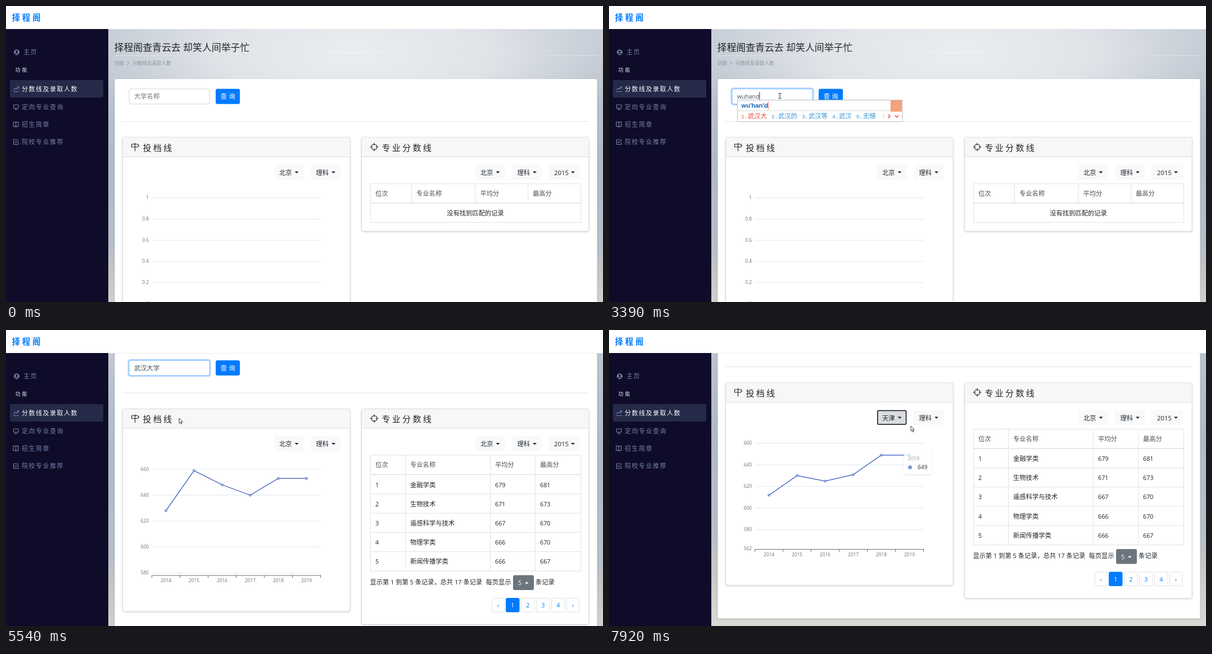
Animation, 1062 px wide and 527 px high, one loop 8000 ms. Source, as an HTML page:

```html
<!DOCTYPE html>
<html lang="zh-CN">
<head>
<meta charset="utf-8">
<title>分数线查询</title>
<style>
html, body { margin: 0; width: 100%; height: 100%; overflow: hidden; background: #fff; }
svg { display: block; width: 100%; height: 100%; font-family: "Open Sans", "Noto Sans CJK SC", "Noto Sans CJK", sans-serif; }
.mid { text-anchor: middle; }
.end { text-anchor: end; }
.bold { font-weight: 700; }
.ime { font-family: "Liberation Sans", sans-serif; font-weight: 700; }
.mono { font-family: "Liberation Mono", monospace; }
.line { fill: none; stroke-linecap: round; stroke-linejoin: round; }
.card { filter: drop-shadow(0 1px 1.5px rgba(0,0,0,.16)); }
</style>
</head>
<body>
<svg viewBox="0 0 1062 527" preserveAspectRatio="none">
  <defs>
    <linearGradient id="sky" x2="0" y2="1">
      <stop offset="0" stop-color="#c3cad4"/><stop offset=".45" stop-color="#b0bac7"/>
      <stop offset=".72" stop-color="#b7bfc9"/><stop offset=".8" stop-color="#c6c5c3"/>
      <stop offset="1" stop-color="#dddbd7"/>
    </linearGradient>
    <radialGradient id="glow">
      <stop offset="0" stop-color="#eceef1"/><stop offset=".5" stop-color="#e5e8ec" stop-opacity=".85"/>
      <stop offset="1" stop-color="#dfe3e8" stop-opacity="0"/>
    </radialGradient>
    <clipPath id="view"><path d="M182 41H1062V527H182z"/></clipPath>
  </defs>
  <g clip-path="url(#view)"><g id="page">
    <g id="backdrop"></g><g id="frame"></g><g id="search"></g>
    <g id="table"></g><g id="chart"></g><g id="picker"></g>
  </g></g>
  <g id="shell"></g><g id="overlay"></g><g id="cursor"></g>
</svg>
<script>
const LOOP = 8000, BLINK = 530;
const FOCUS = 1380, COMMIT = 3700, RESULT = 4230, CHART = 4310, HOVER = 5980, OPEN = 6770, PICK = 7540;
const BRAND = '择程阁', INK = '#212529', GREY = '#dee2e6';

const cache = {};
function put(id, html) {
  if (cache[id] !== html) document.getElementById(id).innerHTML = cache[id] = html;
}
const text = (x, y, s, size = 11.3, fill = INK, more = '') =>
  `<text x="${x}" y="${y}" font-size="${size}" fill="${fill}" ${more}>${s}</text>`;
const rect = (x, y, w, h, fill, r = 0, more = '') =>
  `<rect x="${x}" y="${y}" width="${w}" height="${h}" rx="${r}" fill="${fill}" ${more}/>`;
const path = (d, stroke, width = 1, more = '') =>
  `<path class="line" d="${d}" stroke="${stroke}" stroke-width="${width}" ${more}/>`;
const spaced = n => `letter-spacing="${n}"`;
const clamp = v => Math.min(1, Math.max(0, v));
const mix = (a, b, k) => a + (b - a) * k;
const ease = k => k * k * (3 - 2 * k);

// Position on a list of [time, ...values] keys
function track(keys, t) {
  let i = 0;
  while (i < keys.length - 2 && t >= keys[i + 1][0]) i++;
  const [a, b] = [keys[i], keys[i + 1]];
  const k = clamp((t - a[0]) / (b[0] - a[0]));
  return a.slice(1).map((v, j) => mix(v, b[j + 1], k));
}

const pen = document.createElement('canvas').getContext('2d');
function widthOf(s, font) {
  pen.font = font;
  return pen.measureText(s).width;
}

function dropdown(x, w, label, fill = '#f8f9fa', more = '') {
  const c = x + w - 16;
  return rect(x, 282.5, w, 26.5, fill, 2.5, more) + text(x + 9.5, 300.5, label) +
    `<path d="M${c} 294.5h7l-3.5 3.5z" fill="${INK}"/>`;
}

function card(x, bottom, title, icon) {
  return `<g class="card">${rect(x, 234, 404.5, bottom - 234, '#fff', 3, 'stroke="#d9dadc"')}</g>` +
    rect(x + .5, 234.5, 403.5, 33.5, '#f7f7f7', 2.5) + path(`M${x} 268.5h404`, '#dcdcdc') +
    path(icon, INK, 1.1) + text(x + 36, 257.5, title, 15, INK, spaced(3.3));
}

function drawShell() {
  const muted = '#7680ab';
  const items = [
    [152, '分数线及录取人数', 'M13 152.5h10M13.5 149l3-2.5 2 1.5 4-4M20 144h2.5v2.5'],
    [183.5, '定向专业查询', 'M13.5 176h8.500v6h-8.500zM17.500 182v2M15.500 184.500h4.500'],
    [215, '招生简章', 'M17.500 207.500q-2-1.500-4.500-1v8q2.500-.5 4.500 1 2-1.500 4.500-1v-8q-2.500-.5-4.500 1v8'],
    [246, '院校专业推荐', 'M20 238h-6.500v8.500h8.500v-4M15.500 241.500l2 2.500 5-6']
  ];
  put('shell',
    rect(0, 0, 1062, 41, '#fff') + path('M0 41.500H1062', '#dfe1e5', .6) +
    text(10.5, 26, BRAND, 14.5, '#007bff', 'class="bold" ' + spaced(3.7)) +
    rect(0, 41, 182, 486, '#0e0c28') + rect(7, 132, 166, 31, '#252a49', 2) +
    `<circle cx="19" cy="82.500" r="5" fill="${muted}"/><circle cx="19" cy="81" r="1.900" fill="#0e0c28"/>` +
    path('M16 85.500q3-3 6 0', '#0e0c28', 1.4) +
    text(31, 86, '主页', 11, muted, spaced(1.5)) +
    text(16.5, 117, '功能', 9, '#e6e8f2', spaced(3)) +
    items.map(([y, s, icon], i) => path(icon, muted, 1.1) +
      text(28, y, s, 11, i ? muted : '#fff', spaced(1.5))).join(''));
}

function drawFrame(full) {
  put('backdrop', rect(182, 41, 880, full ? 640 : 540, 'url(#sky)') +
    `<ellipse cx="${full ? 560 : 620}" cy="85" rx="${full ? 450 : 500}" ry="170" fill="url(#glow)"/>`);
  put('frame',
    path('M193 88.500H1052', GREY) +
    text(192.5, 80, BRAND + '查青云去 却笑人间举子忙', 16.9) +
    text(193, 105, '功能', 8.55, '#8f959d') + path('M216 99.500l2.500 2.500-2.500 2.500', '#7d848c') +
    text(225, 105, '分数线及录取人数', 8.55, '#8f959d') +
    `<g class="card">${rect(193.5, 130, 858, full ? 523.5 : 501, '#fff', 3)}</g>` +
    path('M207 205.500H1037', '#e5e5e5') +
    card(207.5, 594.5, '投档线', 'M229.500 244v14M229.500 246h-6v5h10.500l2.500-2.500-2.500-2.500z') +
    card(632.5, full ? 617.5 : 401, '专业分数线',
      'M650 251a5 5 0 1 0 10 0a5 5 0 1 0-10 0M655 244v4M655 254v4M648 251h4M658 251h4') +
    dropdown(542, 53, '理科') + dropdown(834.5, 53, '北京') +
    dropdown(900, 53, '理科') + dropdown(965.5, 55.5, '2015'));
}

function drawTable(full) {
  const cols = full ? [648.5, 710.5, 861.5, 941.5, 1022.5] : [648.5, 721.5, 835, 928.5, 1022.5];
  const rows = ['金融学类 679 681', '生物技术 671 673', '遥感科学与技术 667 670', '物理学类 666 670', '新闻传播学类 666 667'];
  const bottom = full ? 522.5 : 385.5;
  let s = rect(648.5, 316.5, 374, bottom - 316.5, '#fff', 0, `stroke="${GREY}"`) +
    path('M648.500 351H1022.500', GREY, 1.6);
  cols.slice(1, 4).forEach(x => s += path(`M${x} 316.500V${full ? bottom : 351}`, GREY));
  ['位次', '专业名称', '平均分', '最高分'].forEach((h, i) => s += text(cols[i] + 8.5, 337.5, h, 11.3, '#495057'));
  if (!full) return put('table', s + text(835, 373, '没有找到匹配的记录', 11.3, INK, 'class="mid"'));
  rows.forEach((row, i) => {
    const y = 373 + i * 34.2;
    if (i) s += path(`M648.500 ${y - 21.7}H1022.500`, GREY);
    [i + 1, ...row.split(' ')].forEach((v, j) =>
      s += text(cols[j] + 8.5, y, v, j === 1 ? 11.3 : 10.8));
  });
  s += text(647.5, 546, '显示第 1 到第 5 条记录，总共 17 条记录', 11.2) + text(853.5, 546, '每页显示') +
    rect(902, 530, 37, 26.5, '#6c757d', 3) + text(911, 547.5, 5, 10.8, '#fff') +
    '<path d="M923 545h6.500l-3.250-3.500z" fill="#fff"/>' + text(942, 546, '条记录');
  ['‹', 1, 2, 3, 4, '›'].forEach((p, i) => {
    const x = [864.5, 889.5, 916.5, 943.5, 970.5, 997.5][i], w = i % 5 ? 23.5 : 22, on = p === 1;
    s += rect(x, 571, w, 24.5, on ? '#007bff' : '#fff', 2, `stroke="${on ? '#007bff' : GREY}"`) +
      text(x + w / 2, 587.5, p, 10.8, on ? '#fff' : '#007bff', 'class="mid"');
  });
  put('table', s);
}

function drawChart(t) {
  const BASE = 530.5, HIGH = 189, soft = '#6e7079';
  const full = t >= CHART, k = ease(clamp((t - PICK) / 320));
  const min = full ? mix(578, 562, k) : 0, max = full ? 660 : 1;
  const yOf = v => BASE - (v - min) / (max - min) * HIGH;
  const label = (y, v, o = 1) => text(254, y + 2.5, v, 8.4, soft, `class="end" opacity="${o}"`);
  const ticks = full ? [580, 600, 620, 640, 660] : [0, .2, .4, .6, .8, 1];
  let s = ticks.map(v => path(`M260 ${yOf(v)}H560`, '#e0e6f1') + label(yOf(v), v)).join('');
  s += path(`M260 ${BASE}H560` + [0, 1, 2, 3, 4, 5, 6].map(i => `M${259.5 + i * 50} ${BASE}v4`).join(''), soft);
  if (full) {
    if (k) s += label(BASE - 1.5, 562, k);
    const before = [628, 659, 648, 640, 653, 653], after = [612, 630, 625, 631, 649, 649];
    const dots = before.map((v, i) => [284.5 + i * 50, yOf(mix(v, after[i], k))]);
    s += dots.map(([x], i) => text(x, BASE + 12, 2014 + i, 8.4, soft, 'class="mid"')).join('') +
      path('M' + dots.join('L'), '#5470c6', 1.5) +
      dots.map(([x, y]) => `<circle cx="${x}" cy="${y}" r="1.600" fill="#fff" stroke="#5470c6" stroke-width="1.300"/>`).join('');
    if (t >= 7630 && t < 7850) s += path(`M534.500 ${BASE}V341.500`, '#b9bec9', .8, 'stroke-dasharray="3 3"');
  }
  put('chart', s);
}

function drawPicker(t) {
  const fill = t >= OPEN ? '#d9dce1' : t >= HOVER ? '#e0e3e7' : '#f8f9fa';
  let s = dropdown(476.5, 53, t >= PICK ? '天津' : '北京', fill);
  if (t >= OPEN) s += rect(477.8, 283.4, 50.7, 24.7, 'none', 2, 'stroke="#15151c" stroke-width="1.500"');
  put('picker', s);
}

const typing = [
  [2290, 'w', '我 为 问 无 ⑤'], [2610, "wu", '无 五 吴 物 ⑤'],
  [2840, "wu'h", '武汉 误会 舞会 无悔 武侯'], [3160, "wu'ha", '武汉 无害 五行 误航 无憾'],
  [3230, "wu'han", '武汉 无憾 五行 无汗 无寒'], [3390, "wu'han'd", '武汉大 武汉的 武汉等 武汉 无憾'],
  [3470, "wu'han'da", '武汉大 武汉达 武汉打 武汉 无憾'], [3620, "wu'han'da'x", '武汉大学 武汉大 武汉 无憾 五行']
];
const typed = t => t < COMMIT ? typing.filter(e => t >= e[0]).pop() : undefined;

function drawSearch(t) {
  const entry = typed(t), done = t >= COMMIT, focus = clamp((t - FOCUS) / 150);
  let s = focus ? rect(217.6, 146.4, 145.8, 29.2, 'none', 4, `stroke="#007bff" stroke-opacity="${.3 * focus}" stroke-width="2.400"`) : '';
  s += rect(219, 147.7, 143, 26.8, '#fff', 3, `stroke="${focus > .5 ? '#80bdff' : '#ced4da'}"`);
  let x = 228;
  if (entry) {
    const raw = entry[1].replace(/'/g, '');
    s += text(228, 165, raw, 10.4, '#495057');
    x += widthOf(raw, '10.4px "Open Sans", sans-serif');
  } else {
    s += text(228, 165, done ? '武汉大学' : '大学名称', 11.3, done ? '#495057' : '#6c757d');
    if (done) x += 44.7;
  }
  const since = done ? COMMIT : FOCUS;
  const lit = entry || (t >= FOCUS && Math.floor((t - since) / BLINK) % 2 === 0);
  if (lit) s += path(`M${x + .5} 153.500v14`, '#222', .9);
  s += rect(373, 147.5, 43, 27, '#007bff', 3) + text(381.5, 165, '查询', 11.5, '#fff', spaced(3.2));
  put('search', s);
}

function imePopup([, pinyin, words]) {
  let x = 235, list = '';
  words.split(' ').forEach((w, i) => {
    const fill = i ? '#3693d8' : '#ee4436';
    list += text(x, 200, i + 1 + '.', 9.4, fill, 'class="mono"') + text(x + 12, 200, w, 11.3, fill, 'font-weight="300"');
    x += 20.1 + 11.3 * w.length;
  });
  const right = x + 39.5;
  const caret = 236 + widthOf(pinyin, 'bold 11.1px "Liberation Sans", sans-serif');
  return rect(228.5, 167.5, right - 228.5, 38.5, '#fff', 0, 'stroke="#b9b9bd"') +
    path(`M229 186.500H${right - 22}`, '#dadada') +
    text(235.5, 181, pinyin, 11.1, '#1565b5', 'class="ime"') + path(`M${caret} 171v13`, '#f0503c', .9) + list +
    path(`M${right - 32} 193.500l-2.500 3 2.500 3`, '#bbb') +
    path(`M${right - 25} 193.500l3 3-3 3M${right - 13} 195l3 3 3-3`, '#ee4436', 1.4) +
    rect(right - 21, 168, 20, 20, '#f6a27c');
}

function menu(t) {
  const names = '北京 天津 河北 山西 内蒙古 辽宁 吉林 黑龙江 上海 江苏 浙江 安徽 福建 江西'.split(' ');
  const hot = pointer(t)[1] > 200 ? 1 : pointer(t)[1] > 177 ? 0 : -1;
  return rect(476.5, 171, 94, 339.5, '#fff', 3, 'stroke="#cfcfd1"') + names.map((n, i) =>
    (i === hot ? rect(477, 177 + i * 23.4, 93, 23.4, '#f0f1f3') : '') + text(493, 193 + i * 23.4, n)).join('');
}

function tooltip(t) {
  const k = ease(clamp((t - 7630) / 290));
  const show = clamp((t - 7600) / 120) * (1 - .28 * clamp((t - 7850) / 70));
  return `<g transform="translate(${mix(512, 524, k)} ${mix(236, 216, k)})" opacity="${show}"><g class="card">` +
    rect(0, 0, 50.5, 41, '#fff', 3) + '</g>' + text(8, 16, 2019, 8.8, '#777') +
    '<circle cx="11.500" cy="28.500" r="3.500" fill="#5470c6"/>' +
    text(25, 32, 649, 10.2, '#555', 'class="bold"') + '</g>';
}

function drawOverlay(t) {
  const entry = typed(t);
  put('overlay', entry ? imePopup(entry) : t >= OPEN && t < PICK ? menu(t) : t >= 7600 ? tooltip(t) : '');
}

const route = [
  [200, 1012, 514], [430, 770, 370], [640, 520, 235], [800, 350, 179], [970, 305, 225],
  [1050, 304, 222], [1330, 304, 160], [5230, 304, 160], [5330, 308, 157], [5760, 308, 157],
  [5990, 492, 123], [6310, 511, 151], [6770, 511, 151], [7250, 514, 212], [7540, 514, 212], [7910, 537, 171]
];
const pointer = t => track(route, t);

function drawCursor(t) {
  const [x, y] = pointer(t);
  const beam = t > 1190 && t < 5300, hand = t >= HOVER && t < PICK;
  const shape = beam
    ? path('M-2-4.500h1.500l.5.500.5-.5h1.500M0-4v8M-2 4.500h1.500l.5-.5.5.5h1.500', '#111', .9)
    : hand
      ? '<path d="M0 0q1.300-1 1.700.4l.7 3.800 4.100.9q1.200.4 1 1.800l-.8 4.200-.9 1.700h-4.300l-3.400-4.600q-.2-1.400 1.600-.6l.8.900z" fill="#fff" stroke="#111" stroke-width=".800"/>'
      : '<path d="M0 0v9.200l2.100-2 1.500 3.300 1.400-.6-1.500-3.200h2.900z" fill="#fff" stroke="#111" stroke-width=".800"/>';
  put('cursor', t < 200 ? '' : `<g transform="translate(${x} ${y})">${shape}</g>`);
}

const wheel = [[5180, 0], [5300, 46.7], [5380, 46.7], [5500, 93.5], [5620, 93.5], [5760, 140]];
const page = document.getElementById('page');

function render(now) {
  const t = now % LOOP, full = t >= RESULT;
  page.setAttribute('transform', `translate(0 ${-track(wheel, t)[0]})`);
  drawFrame(full);
  drawSearch(t);
  drawTable(full);
  drawChart(t);
  drawPicker(t);
  drawOverlay(t);
  drawCursor(t);
}

drawShell();
const start = performance.now();
function tick() {
  render(performance.now() - start);
  requestAnimationFrame(tick);
}
tick();
</script>
</body>
</html>
```
